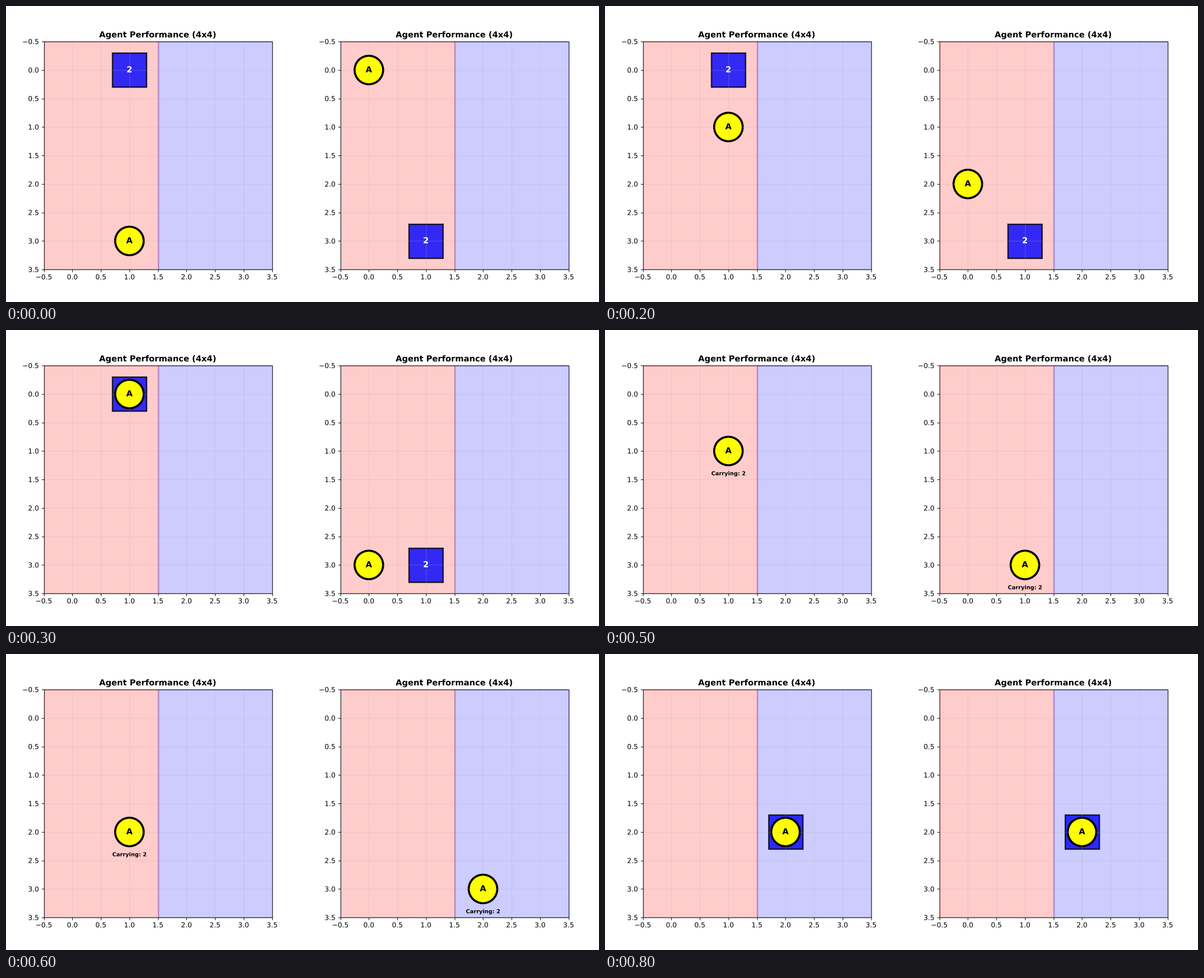
These frames come from a looping animation (1058x529 px, 0.9 s). A matplotlib script:

```python
from math import floor

import matplotlib.pyplot as plt
from matplotlib.animation import FuncAnimation
from matplotlib.patches import Circle, Rectangle
from matplotlib.patheffects import Normal

plt.rcParams.update({"font.family": "DejaVu Sans", "path.snap": False,
                     "text.hinting": "none"})

FRAMES, INTERVAL = 9, 100
DROP_FRAME, DROP_CELL = 8, (2, 2)

# Layout in design pixels: two square panels side by side, 100 per inch.
PANEL, LEFT, TOP, CELL = 600, 76.5, 72, 115.5
POINT = 100 / 72
TICKS = [k / 2 - 0.5 for k in range(9)]


def snap(v):
    """Centre of the design pixel that a crisp line falls on."""
    return floor(v + 0.5) + 0.5


class Panel:
    """One grid world: an agent fetches a box and carries it to the blue side."""

    def __init__(self, ax, offset, path, box_cell, pick_frame):
        self.ax, self.offset = ax, offset
        self.path, self.box_cell, self.pick_frame = path, box_cell, pick_frame
        self.clip = Rectangle((offset + floor(LEFT + 0.5), TOP),
                              4 * CELL, 4 * CELL, transform=ax.transData)

        for x, color in ((-0.5, "red"), (1.5, "blue")):
            region = self.rect(x, -0.5, 2, 4, facecolor=color,
                               edgecolor=color, lw=2, alpha=0.2)
            region.set_clip_path(self.clip)
        self.box = self.rect(0, 0, 0.6, 0.6, facecolor="blue",
                             edgecolor="black", lw=2, alpha=0.8)
        self.agent = ax.add_patch(Circle((0, 0), 0.25 * CELL, lw=3,
                                         facecolor="yellow", edgecolor="black"))
        self.draw_axes()

        self.box_label = self.text(0, 0, "2", 12, color="white", weight="bold")
        self.agent_label = self.text(0, 0, "A", 12, weight="bold")
        self.carry_label = self.text(0, 0, "Carrying: 2", 8, weight="bold")

    def point(self, x, y):
        return self.offset + LEFT + CELL * (x + 0.5), TOP + CELL * (y + 0.5)

    def snapped(self, x, y):
        return tuple(snap(v) for v in self.point(x, y))

    def bounds(self, x, y, w, h):
        x0, y0 = self.snapped(x, y)
        x1, y1 = self.snapped(x + w, y + h)
        return x0, y0, x1 - x0, y1 - y0

    def rect(self, x, y, w, h, **style):
        x, y, w, h = self.bounds(x, y, w, h)
        return self.ax.add_patch(Rectangle((x, y), w, h, **style))

    def line(self, xs, ys, **style):
        return self.ax.plot(xs, ys, lw=0.8, solid_capstyle="butt", **style)[0]

    def text(self, x, y, s, size, ha="center", va="center", **style):
        # Drawn as outlines, so that text keeps its fractional position.
        return self.ax.text(x, y, s, fontsize=size, ha=ha, va=va,
                            path_effects=[Normal()], **style)

    def draw_axes(self):
        x0, y0 = self.snapped(-0.5, -0.5)
        x1, y1 = self.snapped(3.5, 3.5)
        left, bottom = self.point(-0.5, 3.5)
        pad = 7 * POINT
        for value in TICKS:
            x, y = self.point(value, value)
            gx, gy = snap(x), snap(y)
            for xs, ys in (((gx, gx), (y0, y1)), ((x0, x1), (gy, gy))):
                grid = self.line(xs, ys, color="#b0b0b0", alpha=0.3, zorder=1.5)
                grid.set_clip_path(self.clip)
            self.line((gx, gx), (y1, y1 + 5), color="black")
            self.line((x0 - 5, x0), (gy, gy), color="black")
            name = f"{value:.1f}".replace("-", "\N{MINUS SIGN}")
            self.text(x, bottom + pad, name, 10, va="top")
            self.text(left - pad, y, name, 10, ha="right", va="center_baseline")
        self.rect(-0.5, -0.5, 4, 4, fill=False, edgecolor="black",
                  lw=0.8, zorder=2.5)
        self.text(self.point(1.5, 0)[0], TOP - 6 * POINT,
                  "Agent Performance (4x4)", 12, va="baseline", weight="bold")

    def draw(self, frame):
        x, y = self.path[frame]
        self.agent.center = self.point(x, y)
        self.agent_label.set_position(self.point(x, y))

        carrying = self.pick_frame <= frame < DROP_FRAME
        self.carry_label.set_position(self.point(x, y + 0.4))
        self.carry_label.set_visible(carrying)

        cell = self.box_cell if frame < DROP_FRAME else DROP_CELL
        self.box.set_bounds(self.bounds(cell[0] - 0.3, cell[1] - 0.3, 0.6, 0.6))
        self.box.set_visible(not carrying)
        self.box_label.set_position(self.point(*cell))
        self.box_label.set_visible(not carrying and cell != (x, y))
        return (self.box, self.agent, self.box_label,
                self.agent_label, self.carry_label)


def walk(start, moves):
    """Cells visited from start; U, D, R step one cell and '.' waits."""
    steps = {"U": (0, -1), "D": (0, 1), "R": (1, 0), ".": (0, 0)}
    cells = [start]
    for move in moves:
        dx, dy = steps[move]
        cells.append((cells[-1][0] + dx, cells[-1][1] + dy))
    return cells


fig = plt.figure(figsize=(12, 6), dpi=88.1667, facecolor="white")
stage = fig.add_axes([0, 0, 1, 1], xlim=(0, 2 * PANEL), ylim=(PANEL, 0))
stage.axis("off")
panels = [
    Panel(stage, 0, walk((1, 3), "UUU.DDR."), (1, 0), pick_frame=4),
    Panel(stage, PANEL, walk((0, 0), "DDDR.RU."), (1, 3), pick_frame=5),
]


def update(frame):
    return [artist for panel in panels for artist in panel.draw(frame)]


anim = FuncAnimation(fig, update, frames=FRAMES, interval=INTERVAL,
                     repeat=True, repeat_delay=0, blit=False)
plt.show()
```
